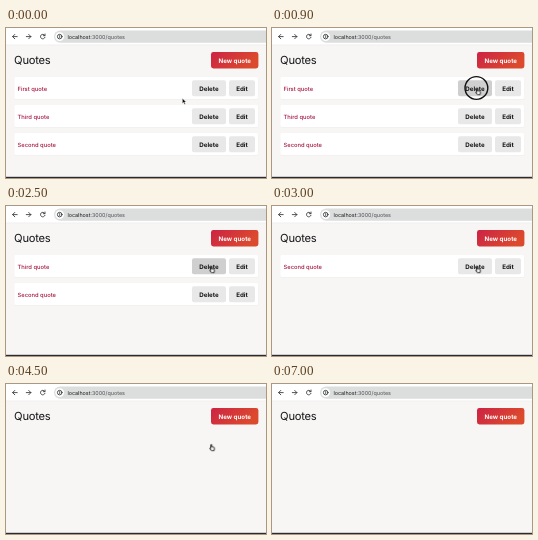
An HTML page that plays this animation: 260x150 px, repeating every 7.4 s.

```html
<!DOCTYPE html>
<html lang="en">
<head>
<meta charset="utf-8">
<title>Quotes</title>
<style>
  html, body { margin: 0; width: 100%; height: 100%; overflow: hidden; }
  svg { display: block; width: 100vw; height: 100vh; }
  text { font-family: Inter, "Liberation Sans", sans-serif; text-rendering: geometricPrecision; }
  .title { font-size: 11.2px; letter-spacing: -.25px; fill: #141416; }
  .url { font-size: 5.4px; fill: #4a4d51; }
  .host { fill: #151618; }
  .name { font-size: 5.8px; font-weight: 500; fill: #a4143e; }
  .label { font-size: 6.2px; font-weight: 700; text-anchor: middle; fill: #141414; }
  .icon { fill: none; stroke: #303336; stroke-width: .85; stroke-linecap: round; stroke-linejoin: round; }

  .row, .row use, .pointer, .arrow, .hand, .click {
    animation: 7400ms step-end infinite;
  }
  .row use { color: #e8e8e8; }
  .first { animation-name: first; }
  .third { animation-name: third; }
  .second { animation-name: second; }
  .first use { animation-name: hover-first; }
  .third use { animation-name: hover-third; }
  .second use { animation-name: hover-second; }
  .pointer { animation-name: move; }
  .arrow { animation-name: arrow; }
  .hand { animation-name: hand; }
  .click { animation-name: click; }

  /* Rows leave at 1200, 2700 and 3800 ms; the rest close up */
  @keyframes first {
    0% { visibility: visible; }
    16.21%, 100% { visibility: hidden; }
  }
  @keyframes third {
    0% { transform: translateY(28px); visibility: visible; }
    16.21% { transform: none; visibility: visible; }
    36.48%, 100% { transform: none; visibility: hidden; }
  }
  @keyframes second {
    0% { transform: translateY(56px); visibility: visible; }
    16.21% { transform: translateY(28px); visibility: visible; }
    36.48% { transform: none; visibility: visible; }
    51.35%, 100% { transform: none; visibility: hidden; }
  }

  @keyframes hover-first {
    0% { color: #e8e8e8; }
    4.05%, 100% { color: #cfcfcf; }
  }
  @keyframes hover-third {
    0% { color: #e8e8e8; }
    25.67%, 100% { color: #cfcfcf; }
  }
  @keyframes hover-second {
    0% { color: #e8e8e8; }
    44.59%, 100% { color: #cfcfcf; }
  }

  /* Pointer positions change every 100 ms while it travels */
  @keyframes move {
    0% { transform: translate(176px, 70px); }
    1.35% { transform: translate(179px, 69px); }
    2.7% { transform: translate(187px, 66px); }
    4.05% { transform: translate(196px, 62.5px); }
    5.4% { transform: translate(202px, 60.5px); }
    6.75% { transform: translate(203.2px, 60.2px); }
    74.32%, 100% { transform: translate(247.5px, 26.5px); }
  }
  @keyframes arrow {
    0% { visibility: visible; }
    4.05%, 100% { visibility: hidden; }
  }
  @keyframes hand {
    0% { visibility: hidden; }
    4.05% { visibility: visible; }
    75.67%, 100% { visibility: hidden; }
  }
  @keyframes click {
    0% { visibility: hidden; }
    12.16% { visibility: visible; }
    16.21% { visibility: hidden; }
    29.72% { visibility: visible; }
    33.78% { visibility: hidden; }
    45.94% { visibility: visible; }
    49.99%, 100% { visibility: hidden; }
  }
</style>
</head>
<body>
<svg viewBox="0 0 260 150">
  <defs>
    <linearGradient id="primary" x1="0" y1="0" x2="1" y2=".35">
      <stop stop-color="#cc2345"/>
      <stop offset="1" stop-color="#dc4a2d"/>
    </linearGradient>
    <g id="card">
      <rect x="8.5" y="49.5" width="244" height="22.4" rx="1.5" fill="#f3f1ef"/>
      <rect x="8.5" y="49" width="243.5" height="22" rx="1.5" fill="#fff"/>
      <rect x="186" y="52.2" width="34" height="16" rx="2" fill="currentColor"/>
      <rect x="223" y="52.2" width="26" height="16" rx="2" fill="#e8e8e8"/>
      <text class="label" x="203" y="62.6">Delete</text>
      <text class="label" x="236" y="62.6">Edit</text>
    </g>
  </defs>

  <rect width="260" height="150" fill="#f8f6f4"/>

  <!-- Browser bar -->
  <rect width="260" height="17" fill="#fff"/>
  <rect y="16.7" width="260" height=".5" fill="#e4e4e4"/>
  <rect x="48" y="2.4" width="224" height="12.4" rx="6.2" fill="#dcdddd"/>
  <circle cx="53.7" cy="8.6" r="4.4" fill="#fff"/>
  <g class="icon">
    <path d="M11.2 8.6H6.7M8.8 6.4 6.6 8.6l2.2 2.2"/>
    <path d="M20.3 8.6h4.5M22.7 6.4l2.2 2.2-2.2 2.2"/>
    <path d="M38.8 7.4A2.3 2.3 0 1 0 39 9.3M39 6v1.7h-1.7"/>
    <circle cx="53.7" cy="8.6" r="2.3"/>
    <path d="M53.7 8.5v1M53.7 7.4v.05"/>
  </g>
  <text class="url" x="61.4" y="10.5"><tspan class="host">localhost</tspan>:3000/quotes</text>

  <!-- Page -->
  <text class="title" x="8.1" y="35.8">Quotes</text>
  <rect x="205" y="24" width="47.4" height="16.4" rx="2.4" fill="url(#primary)"/>
  <text class="label" x="228.8" y="34.5" style="fill:#fff">New quote</text>

  <g class="row first"><use href="#card"/><text class="name" x="11.5" y="62.6">First quote</text></g>
  <g class="row third"><use href="#card"/><text class="name" x="11.5" y="62.6">Third quote</text></g>
  <g class="row second"><use href="#card"/><text class="name" x="11.5" y="62.6">Second quote</text></g>

  <rect y="148.8" width="260" height="1.2" fill="#2b2b2d"/>

  <!-- Pointer -->
  <circle class="click" cx="204.4" cy="60" r="11.4" fill="none" stroke="#111" stroke-width="1.4"/>
  <g class="pointer" stroke-linejoin="round">
    <path class="arrow" d="M.3.3v5.3l1.3-1.1.9 2 1-.5-.9-1.9h1.7z" fill="#111" stroke="#fff" stroke-width=".5"/>
    <path class="hand" d="M1.5 4.2V.9a.6.6 0 0 1 1.2 0v1.8l1.9.4q.8.2.7 1L4.9 6.4H2.2L.5 4.2q.3-.7 1 0z" fill="#fff" stroke="#111" stroke-width=".9"/>
  </g>
</svg>
</body>
</html>
```
